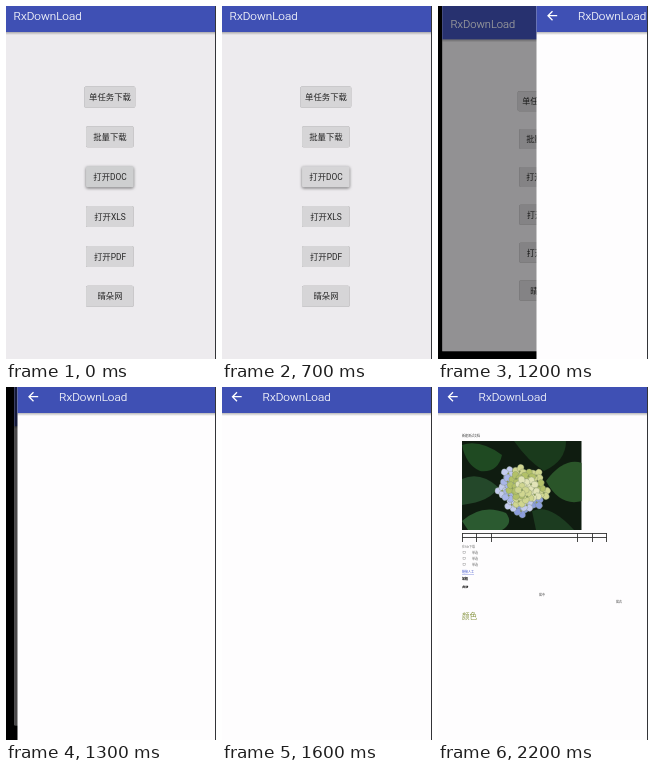
Animation, 210 px wide and 353 px high, one loop 4.7 s. Source, as an HTML page:

```html
<!DOCTYPE html>
<html lang="zh">
<head>
<meta charset="utf-8">
<style>
html, body { margin: 0; width: 100%; height: 100%; overflow: hidden; background: #000; }
svg { display: block; width: 210px; height: 353px; font-family: Roboto, "Noto Sans CJK SC", "Noto Sans CJK", sans-serif; }
.title { font-size: 11.7px; font-weight: 300; fill: #fff; stroke: #fff; stroke-width: .15px; }
.label { font-size: 8.4px; fill: #262626; text-anchor: middle; }
.btn { fill: #d6d5d7; filter: drop-shadow(0 .7px .6px #0006); }
.btn.up { filter: drop-shadow(0 1.2px 1.6px #0008); }
#doc { font-size: 3px; fill: #333; }
</style>
</head>
<body>
<svg viewBox="0 0 210 353">
  <defs>
    <linearGradient id="shade" x2="0" y2="1">
      <stop stop-color="#000" stop-opacity=".28"/>
      <stop offset="1" stop-color="#000" stop-opacity="0"/>
    </linearGradient>
    <clipPath id="frame"><rect x="24" y="54" width="119.5" height="89"/></clipPath>
    <g id="bar">
      <rect x="-1" y="-30" width="211" height="56" fill="#3f50b4"/>
      <rect x="-1" y="26" width="211" height="3" fill="url(#shade)"/>
    </g>
  </defs>
  <g id="home">
    <rect x="-1" y="-30" width="211" height="384" fill="#edebee"/>
    <use href="#bar"/>
    <text class="title" x="7.6" y="14">RxDownLoad</text>
    <g id="buttons"></g>
    <rect id="dim" x="-1" y="-30" width="211" height="384"/>
  </g>
  <g id="page">
    <rect x="-1" width="211" height="353" fill="#fefdfe"/>
    <use href="#bar"/>
    <path d="M19.7 9.7H10.8M15 5.2L10.5 9.7L15 14.2" fill="none" stroke="#fff" stroke-width="1.3"/>
    <text class="title" x="40.6" y="14">RxDownLoad</text>
    <g id="doc">
      <text x="24" y="49.6">新建测试文档</text>
      <g id="photo" clip-path="url(#frame)">
        <rect x="24" y="54" width="120" height="89" fill="#0f1c10"/>
        <path d="M24 58Q42 52 64 68Q60 86 42 84Q28 78 24 58Z" fill="#1f4a22"/>
        <path d="M24 92Q42 84 60 100Q54 114 24 118Z" fill="#24482a"/>
        <path d="M24 134Q44 116 68 126Q76 136 64 143H30Z" fill="#2b5a30"/>
        <path d="M76 54H128Q128 74 106 84Q90 74 76 54Z" fill="#1a3a1c"/>
        <path d="M108 94Q126 70 144 76V114Q122 120 108 94Z" fill="#2a5529"/>
        <path d="M94 124Q112 116 136 143H98Z" fill="#1c3c20"/>
        <g id="bloom"></g>
      </g>
      <path d="M24 146.5H169M24 150.5H169M24.5 146V155M38.5 146V155M53.5 146V155M139.5 146V155M154.5 146V155M168.5 146V155" fill="none" stroke="#333" stroke-width=".9"/>
      <text x="24" y="160.8" fill="#777">在file下载</text>
      <g id="checks"></g>
      <text x="24" y="186" fill="#3348c8" text-decoration="underline">链接人工</text>
      <text x="24" y="193.3" font-weight="700" fill="#000">加粗</text>
      <text x="24" y="200.8" font-weight="700" font-style="italic" fill="#000">斜体</text>
      <text x="104" y="208.8" text-anchor="middle">居中</text>
      <text x="184" y="215.7" text-anchor="end">居右</text>
      <text x="24" y="232.2" font-size="7.6" fill="#8b9848">颜色</text>
    </g>
  </g>
  <rect x="209" width="1" height="353" fill="#333438"/>
</svg>
<script>
const $ = id => document.getElementById(id);
const labels = ['单任务下载', '批量下载', '打开DOC', '打开XLS', '打开PDF', '晴朵网'];

$('buttons').innerHTML = labels.map((s, i) => {
  const y = 91.2 + i * 39.85, w = i ? 47.5 : 51;
  return `<rect class="btn" x="${103.8 - w / 2}" y="${y - 10.7}" width="${w}" height="21" rx="1.5"/>
    <text class="label" x="104" y="${y + 3}">${s}</text>`;
}).join('');
const docButton = document.querySelectorAll('.btn')[2];

$('checks').innerHTML = [165.5, 171.6, 177.6].map(y =>
  `<rect x="25" y="${y - 1.3}" width="2.4" height="2.4" fill="none" stroke="#888" stroke-width=".4"/>
   <text x="34" y="${y + 1.2}" fill="#666">单选</text>`).join('');

// Flower head: four-petal florets on a sunflower spiral, lavender along the rim
const creams = ['#d0d690', '#b3c168', '#e2e4b8'], blues = ['#a9b6e8', '#8c9edc', '#c3cbee'];
let bloom = '';
for (let i = 21; i >= 0; i--) {
  const a = i * 2.4, r = Math.sqrt(i / 21);
  const x = 84 + 22 * r * Math.cos(a), y = 103 + 22 * r * Math.sin(a);
  const color = (r > .6 && (x < 78 || y > 114) ? blues : creams)[i % 3];
  bloom += `<g transform="translate(${x} ${y}) rotate(${i * 37})" fill="${color}" stroke="#75866a" stroke-width=".3">`;
  for (let k = 0; k < 4; k++)
    bloom += `<ellipse cy="-3.6" rx="3.3" ry="3.7" transform="rotate(${k * 90})"/>`;
  bloom += '<circle r=".8" fill="#8fa04c"/></g>';
}
$('bloom').innerHTML = bloom;

const slide = [210, 99.5, 12.5, 1.5, 0];  // page x, one value per 100 ms

function draw(now) {
  const t = Math.floor(now % 4700 / 100) * 100;
  const step = Math.max(0, Math.min(4, (t - 1100) / 100));
  const x = slide[step], k = 1 - x / 210, s = 1 - .094 * k;
  $('home').setAttribute('transform', `translate(${106 * (1 - s)} ${176 * (1 - s)}) scale(${s})`);
  $('dim').setAttribute('opacity', .73 * k);
  $('page').setAttribute('transform', `translate(${x})`);
  $('doc').style.display = t < 2100 ? 'none' : '';
  docButton.classList.toggle('up', t < 1000);
  docButton.style.fill = t < 300 ? '#cecfd0' : '';
  requestAnimationFrame(draw);
}
draw(0);
</script>
</body>
</html>
```
